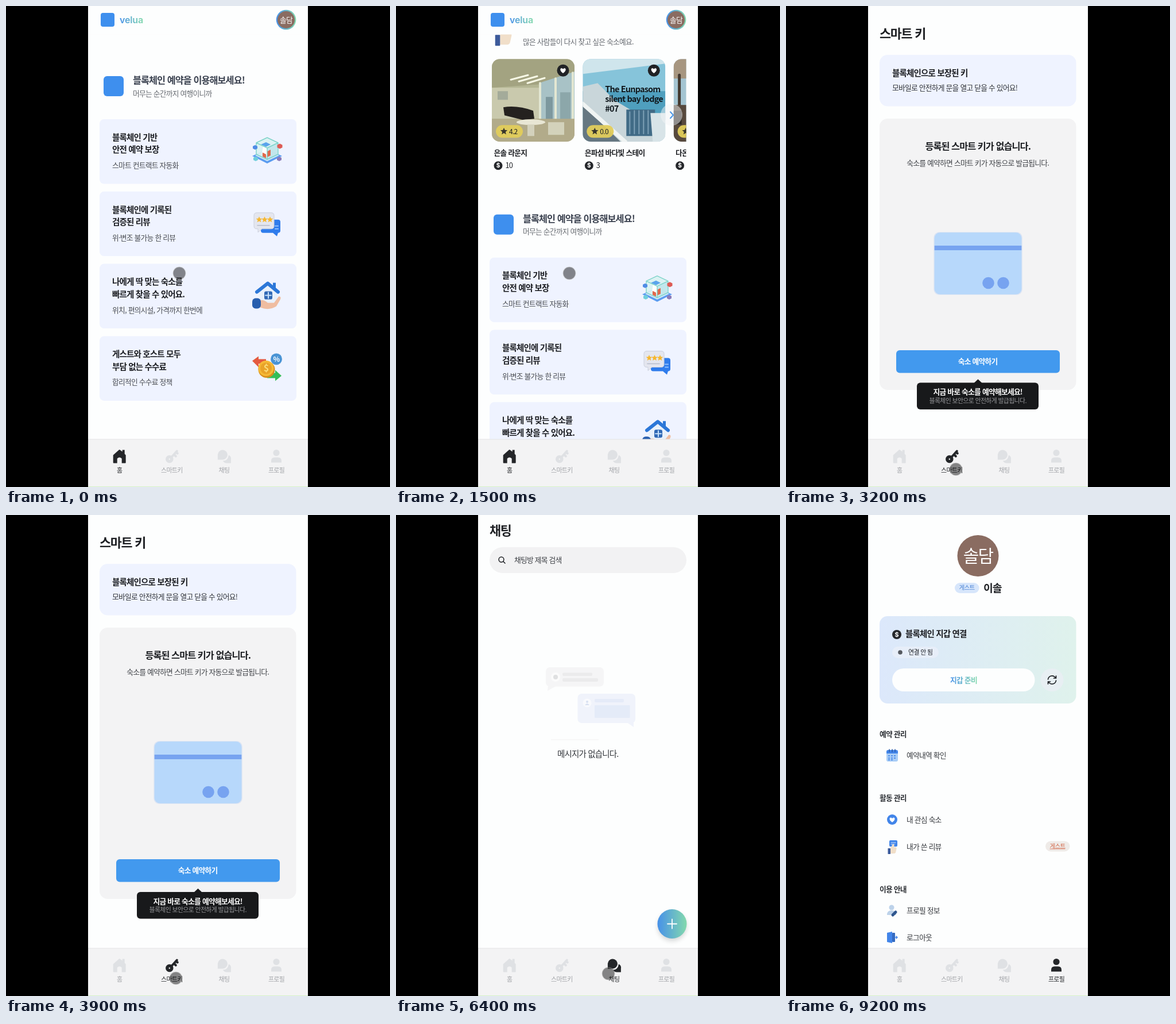
An HTML page that plays this animation: 669 by 837 pixels, repeating every 9300 ms.

```html
<!DOCTYPE html>
<html lang="ko">
<head>
<meta charset="utf-8">
<style>
html, body { margin: 0; width: 100%; height: 100%; overflow: hidden; background: #000; }
svg { display: block; }
text { font-family: "Noto Sans CJK KR", "Noto Sans CJK JP", "Noto Sans CJK", "Noto Sans", sans-serif; letter-spacing: -.058em; white-space: pre; }
.latin { font-family: Inter, sans-serif; letter-spacing: -.01em; }
</style>
</head>
<body>
<svg id="stage" width="669" height="837" viewBox="0 0 669 837"></svg>
<script>
const LOOP = 9300;
const BLUE = '#4285e9', INK = '#1d1f23', SOFT = '#666a70', BROWN = '#8a6c61';

// Drawing helpers
const rect = (x, y, w, h, fill, rx = 0, extra = '') =>
  `<rect x="${x}" y="${y}" width="${w}" height="${h}" rx="${rx}" fill="${fill}" ${extra}/>`;
const dot = (x, y, r, fill, extra = '') => `<circle cx="${x}" cy="${y}" r="${r}" fill="${fill}" ${extra}/>`;
const path = (d, fill = 'none', extra = '') => `<path d="${d}" fill="${fill}" ${extra}/>`;
const line = (d, color, w, extra = '') =>
  path(d, 'none', `stroke="${color}" stroke-width="${w}" stroke-linecap="round" stroke-linejoin="round" ${extra}`);
const at = (x, y, body, extra = '') => `<g transform="translate(${x} ${y})" ${extra}>${body}</g>`;
const text = (x, mid, size, str, { bold = 400, fill = INK, mode = 'start', cls = '' } = {}) =>
  `<text x="${x}" y="${mid + size * .36}" font-size="${size}" font-weight="${bold}" fill="${fill}" text-anchor="${mode}" class="${cls}">${str}</text>`;
const heavy = (x, mid, size, str, fill = INK, mode = 'start') => text(x, mid, size, str, { bold: 700, fill, mode });
const center = (mid, size, str, fill, bold = 400) => text(334.2, mid, size, str, { bold, fill, mode: 'middle' });

const heart = (x, y, k, fill) =>
  `<path transform="translate(${x} ${y}) scale(${k})" d="M0 9C-4 6-9 2-9-3C-9-9-2-9 0-4C2-9 9-9 9-3C9 2 4 6 0 9Z" fill="${fill}"/>`;
const star = (x, y, r, fill) => {
  const pts = Array.from({ length: 10 }, (_, i) => {
    const a = i * Math.PI / 5, q = i % 2 ? r * .45 : r;
    return (x + q * Math.sin(a)).toFixed(1) + ',' + (y - q * Math.cos(a)).toFixed(1);
  });
  return `<polygon points="${pts.join(' ')}" fill="${fill}"/>`;
};
const coin = (x, y, r) => dot(x, y, r, '#25272b') +
  text(x, y, r * 1.35, '$', { bold: 700, fill: '#fff', mode: 'middle', cls: 'latin' });
const loupe = (x, y) => dot(x - .5, y - .5, 4.4, 'none', `stroke="${INK}" stroke-width="1.5"`) +
  line(`M${x + 3} ${y + 3}l3 3`, INK, 1.5);
const search = (y, hint) => rect(163, y, 343, 45, '#f2f2f3', 22.5) +
  loupe(184, y + 22) + text(206, y + 22, 12.75, hint, { fill: '#3c3f44' });
const button = (x, y, w, label) => rect(x, y, w, 39.5, '#4299ee', 6) + center(y + 19.5, 12.75, label, '#fff', 700);

// Room pictures, 144 x 144
const frames = (x, y, n, colors) => Array.from({ length: n }, (_, i) =>
  rect(x + i * 19 % 62, y + i * 13 % 47, 9 + i % 3 * 3, 10 + i % 2 * 4, colors[i % colors.length])).join('');
const photos = {
  lamp: rect(0, 0, 144, 144, '#5f4c3a') + rect(0, 0, 34, 144, '#33281f') + rect(34, 0, 40, 90, '#4b3a29') +
    frames(74, 20, 9, ['#8d7d65', '#737069', '#45423c']) + line('M92 6l10 10 8-6 12 14 6-5 5 14', '#3b4229', 5) +
    dot(42, 76, 27, '#c9662a', 'opacity=".35"') + dot(42, 76, 15, '#ef8a37', 'opacity=".5"') + path('M31 79l6-13h11l7 13z', '#f58a3a') +
    rect(0, 100, 144, 44, '#3d2a1d') + path('M64 106l56 3 8 18-60-3z', '#c2b39c') + rect(74, 84, 20, 16, '#2b2723') +
    path('M12 136h76l8 8H12z', '#304663') + rect(41, 79, 4, 22, '#dd7a32') + rect(4, 45, 29, 34, '#221e1a'),
  studio: rect(0, 0, 144, 144, '#9c8565') + path('M0 0h144v18L70 9 0 30z', '#b5a27f') +
    frames(18, 8, 5, ['#cfc5ae', '#59605a']) + frames(82, 38, 7, ['#dccba9', '#756149']) +
    line('M57 5l8 12-6 10 9 11M50 32l14 6', '#4d5a38', 5) + rect(10, 43, 30, 25, '#63645e') +
    path('M0 75h78v54H0z', '#6b3c26') + rect(4, 69, 34, 12, '#3c6798') + rect(53, 84, 29, 40, '#2b2522') +
    line('M58 90v29M64 90v29M70 90v29M76 90v29', '#8c865f', 2) + path('M98 88l46-6v62h-39z', '#75432a') +
    path('M96 84l48-8v10l-46 8z', '#cfb491') + path('M40 132l60-10 10 22H40z', '#b87447') + path('M0 100q24 8 22 44H0z', '#65627a'),
  lounge: rect(0, 0, 144, 144, '#b4b694') + path('M0 0h144v24L84 44 0 50z', '#a3a381') +
    line('M33 36l30-8M47 39l32-9M62 42l30-9', '#f7f8e6', 3) + rect(0, 50, 84, 54, '#c9c9ad') + rect(10, 56, 18, 15, '#a4ab9a') +
    path('M82 42L144 22v98L82 108z', '#a8c2c6') + rect(94, 66, 12, 42, '#7d989e') + rect(119, 58, 18, 54, '#8ca7aa') +
    line('M84 42v67M111 34v78M141 24v94', '#e3e7d2', 4) + path('M0 104h144v40H0z', '#b2ab8a') +
    path('M20 84q24-4 52 6l2 14-20 2-32-8z', '#24211f') + `<ellipse cx="68" cy="110" rx="25" ry="5" fill="#e8e6d4"/>` +
    rect(62, 114, 12, 20, '#d3d1bc') + rect(98, 110, 28, 22, '#d3d2bb'),
  bay: rect(0, 0, 144, 144, '#86c4da') + path('M0 0h144v8L0 26z', '#cfe5ec') + rect(0, 56, 144, 50, '#4f9fbe') +
    path('M0 48l26-6 30 30 60 36 28 10v26H0z', '#c9d6da') + path('M0 80l66 64H0z', '#667781') + line('M0 78l74 66', '#f0f4f3', 7) +
    rect(76, 88, 50, 46, '#416b86') + line('M82 92v38M90 90v40M98 90v40M106 90v40M114 90v40', '#7da0b6', 2) + path('M118 94h26v50h-22z', '#d8e4e8') +
    ['The Eunpasom', 'silent bay lodge', '#07'].map((s, i) => text(39, 53 + i * 17, 14.5, s, { bold: 900, fill: '#10181d' })).join(''),
  window: rect(0, 0, 144, 144, '#a5c5d2') + rect(0, 0, 144, 34, '#a79680') + line('M10 28v76', '#443a31', 5) +
    rect(0, 80, 144, 64, '#57493d') + rect(0, 90, 14, 24, '#2e2925'),
  corner: rect(0, 0, 144, 144, '#6f7473') + rect(0, 45, 144, 45, '#467a9c') + rect(0, 90, 144, 54, '#41362e') + rect(8, 12, 18, 24, '#a99c83')
};

const stay = (x, y, mark, [pic, name, price, rate]) => at(x, y,
  `<g clip-path="url(#photo)">${photos[pic]}</g>` + dot(124, 20, 10.5, '#202225') + heart(124, 20, .52, mark) +
  rect(7, 115, 47, 22, '#e2cd5b', 11, 'opacity=".95"') + star(21, 126, 6.5, '#37352c') + text(30, 126, 12, rate, { bold: 500 }) +
  heavy(3.5, 163.5, 12.75, name) + coin(11, 185.5, 7.5) + text(23.5, 185.5, 12.75, price, { bold: 500 }));
const stays = (y, icon, mark, title, sub, list) => at(0, y, icon +
  heavy(221, 500, 16.3, title, '#3b4250') + text(221, 523, 12.75, sub, { fill: SOFT }) +
  `<g clip-path="url(#row)">${list.map((s, i) => stay(167 + i * 158.3, 553, mark, s)).join('')}` +
  dot(480, 650, 19, '#f3f6f8', 'opacity=".5"') + line('M478 645l5 5.5-5 5.5', '#4a96e8', 2) + '</g>');

// Feature icons around 0,0
const hex = (x, y, r, fill) => path(`M${x} ${y - r}l${r} ${r / 2}v${r}l${-r} ${r / 2}l${-r} ${-r / 2}v${-r}z`, fill);
const cube = path('M0-2L26 10 0 23-26 10z', '#5b9cf0') + path('M0-1L21 9 0 19-21 9z', '#cfe8f8') +
  path('M0-22L19-13V7L0 16-19 7v-20z', '#d9f3f1', 'opacity=".85"') + path('M0-4L19-13V7L0 16z', '#bce4ea', 'opacity=".8"') +
  path('M-7-8L0-5v15l-9-5z', '#fff') + path('M-11-10l9-4 8 4-8 4z', '#5aa4ec') + path('M0 2l6-3v10l-6 3zM-8 4l6 3v7l-6-3z', '#e06a4d') +
  line('M0-22L19-13V7L0 16-19 7v-20zM-19-13L0-4 19-13M0-4v20', '#7dd3c9', 1.4) +
  hex(-21, -5, 4, '#508ce6') + hex(22, -7, 4.5, '#dd5b55') + hex(-20, 15, 4, '#70cfdc') + hex(21, 15, 4, '#8b7cba');
const review = path('M-7-5h26q4 0 4 4v15q0 4-4 4l-2 6-7-6H-7q-4 0-4-4V-1q0-4 4-4z', '#2f7cec') + line('M14 6h5M14 11h5', '#8fc0ff', 2) +
  path('M-18-17H7q5 0 5 5V6q0 5-5 5h-16l-7 6v-6h-2q-5 0-5-5v-18q0-5 5-5z', '#e4e6ef', 'stroke="#cbd0dd"') +
  [-14, -4.5, 5].map(x => star(x, -5, 5.6, '#f6b72f')).join('') + line('M-17 5H4', '#b7bccb', 1.6);
const home = path('M-15-6L0-19 17-6V15h-31z', '#e9f1fb') + line('M-18-5L1-20 19-5', '#2c77d8', 6) +
  rect(10, -21, 5, 9, '#2c77d8') + rect(-5, -6, 14, 14, '#3169b5', 3) + line('M2-4V6M-3 1H7', '#c7e1fa', 2) +
  path('M-16 10q10-3 17 4h11l8-11q5-1 3 5l-7 12q-13 8-28 2z', '#efbda1') + rect(-26, 6, 15, 18, '#285eae', 6);
const fees = path('M-26-11l11-8v5h13v8h-13v6z', '#e45a3f') + path('M25 15l-11 9v-5H0v-9h14v-5z', '#35bd57') +
  dot(16, -14, 10, '#4a94d5') + heavy(16, -14, 12, '%', '#fff', 'middle') +
  dot(-1, 4, 14.5, '#d9901d') + dot(-2, 2, 13.5, '#f5b935') + dot(-2, 2, 10, '#e9a328') +
  text(-2, 2, 16, '$', { bold: 700, fill: '#fbdc79', mode: 'middle' });
const feature = ([icon, a, b, sub], i) => at(163, 1229 + i * 125.8, rect(0, 0, 343, 112.5, '#eff3ff', 8) +
  heavy(22, 31.5, 14.5, a) + heavy(22, 53, 14.5, b) + text(22, 80.5, 12.75, sub, { fill: '#4a4d53' }) + at(292, 54, icon));
const thumb = (x, y, k = 1) => `<g transform="translate(${x} ${y}) scale(${k})">` +
  path('M-6 0l8-15q6 0 5 7l-1 4h6q4 1 3 6l-3 13q-2 3-6 3H-6z', '#f1dfc9') + rect(-15, 0, 9, 20, '#3d5b9b', 1) + '</g>';

const homePage = `<g id="scroll">` + search(71, '검색을 시작해보세요!') +
  center(170, 18.2, '지금, 새로운 여행을 시작해보세요.', INK, 700) +
  center(196, 12.75, '원하는 숙소를 쉽고 빠르게 찾을 수 있어요.', SOFT) +
  rect(274, 278, 122, 35, '#f2f3f4', 3) + rect(282, 287, 18, 7, '#e0e2e5', 2) + rect(305, 287, 60, 7, '#e0e2e5', 3) + rect(305, 299, 72, 7, '#e0e2e5', 3) +
  dot(293.5, 307.5, 13.5, '#f8fafc', `stroke="${BLUE}" stroke-width="5"`) +
  line('M284 317l-4 5', BLUE, 5) + path('M278 317l7 6-10 13q-3 2-6-1-2-2 0-5z', BLUE) + button(163.5, 370, 342, '지금 검색하기') +
  stays(0, dot(187, 510, 16, BLUE) + heart(187, 510.5, .9, '#fff'), '#55524e', '좋아요 많은 숙소', '여행자들의 마음을 사로잡은 인기 숙소예요.', [
    ['lamp', '누리여숙 #별빛다락방', '2', '0.0'], ['studio', '담솔가옥', '2', '0.0'], ['corner', '포르마루', '3', '0.0']]) +
  stays(330.5, thumb(187, 511, .95), '#fff', '다시 찾는 숙소', '많은 사람들이 다시 찾고 싶은 숙소예요.', [
    ['lounge', '은솔 라운지', '10', '4.2'], ['bay', '은파섬 바다빛 스테이', '3', '0.0'], ['window', '다온 스테이', '4', '0.0']]) +
  rect(170, 1154, 35, 35, '#3e8fee', 6) + heavy(221, 1161, 16.3, '블록체인 예약을 이용해보세요!', '#3b4250') +
  text(221, 1184, 12.75, '머무는 순간까지 여행이니까', { fill: SOFT }) +
  [[cube, '블록체인 기반', '안전 예약 보장', '스마트 컨트랙트 자동화'],
   [review, '블록체인에 기록된', '검증된 리뷰', '위·변조 불가능 한 리뷰'],
   [home, '나에게 딱 맞는 숙소를', '빠르게 찾을 수 있어요.', '위치, 편의시설, 가격까지 한번에'],
   [fees, '게스트와 호스트 모두', '부담 없는 수수료', '합리적인 수수료 정책']].map(feature).join('') + '</g>' +
  rect(143, 0, 383, 49.5, '#fdfefe') + rect(165, 12, 24, 24, '#3e8fee', 4) +
  text(198, 24, 16, 'velua', { bold: 600, fill: 'url(#brand)', cls: 'latin' }) +
  dot(488, 24, 17.3, 'url(#brand)') + dot(488, 24, 15, BROWN) + text(488, 24, 12.75, '솔담', { fill: '#fff', mode: 'middle', bold: 500 });

const keyPage = heavy(163, 48.5, 21.8, '스마트 키') + rect(163, 85, 342.5, 89.5, '#eff3ff', 14) +
  heavy(185, 117, 14.5, '블록체인으로 보장된 키') + text(185, 142, 12.75, '모바일로 안전하게 문을 열고 닫을 수 있어요!', { fill: '#2f3237' }) +
  rect(163, 196, 342.5, 472, '#f3f3f4', 14) + center(244, 16.3, '등록된 스마트 키가 없습니다.', INK, 700) +
  center(273, 12.75, '숙소를 예약하면 스마트 키가 자동으로 발급됩니다.', '#3f4247') +
  `<g id="card">${rect(-76, -54, 152, 108, '#a4d2fb', 10) + rect(-76, -31, 152, 8, '#4080ea') + dot(18, 34, 10.3, '#4080ea') + dot(44, 34, 10.3, '#4080ea')}</g>` +
  rect(258, 394, 153, 108, '#d7e0f8', 9, 'fill-opacity=".36" stroke="#c9daf3" stroke-opacity=".5" stroke-width="1.5"') +
  button(192, 599, 285, '숙소 예약하기') +
  `<g id="tip">${path('M327 657l7.5-7 7.5 7z', '#18191b') + rect(228, 656, 212, 46.5, '#18191b', 6) +
    center(672, 12.75, '지금 바로 숙소를 예약해보세요!', '#fff', 700) + center(687.5, 10.9, '블록체인 보안으로 안전하게 발급됩니다.', '#98999c')}</g>`;

const chatPage = heavy(163, 27, 21.8, '채팅') + search(56, '채팅방 제목 검색') +
  `<g id="bubbles">${path('M265 296l-1 10 16-9z', '#f5f5f6') + rect(261, 265, 101, 33.5, '#f5f5f6', 7) + dot(278, 282, 8, '#fbfbfb') + dot(278, 282, 4, '#dfe0e1') +
    rect(290, 274.5, 52, 5.5, '#ebebec', 2) + rect(290, 284, 62, 6, '#ebebec', 2) +
    path('M401 360l13 9v-12z', '#f0f3fb') + rect(316.5, 311, 100.5, 51, '#f0f3fb', 7) + dot(333, 327, 7.5, '#f9fafd') +
    dot(333, 325, 2, '#d9e1f1') + path('M329 331q4-6 8 0z', '#d9e1f1') + rect(346, 320, 51, 6, '#e5ebf8', 2) + rect(346, 331, 61.5, 22, '#e4ebf8', 1)}</g>` +
  rect(270, 390.5, 83, 1, '#f3f4f4') + center(416, 14.5, '메시지가 없습니다.', '#34373c') +
  dot(481, 716, 25, '#000', 'opacity=".16" filter="url(#blur)"') + dot(481, 711.5, 25.5, 'url(#brand)') + line('M473 711.5h16M481 703.5v16', '#fff', 1.8);

const calendar = rect(-10, -9, 20, 20, '#a9cdf6', 3) + path('M-10-3v-3q0-3 3-3H7q3 0 3 3v3z', BLUE) +
  line('M-5-10v4M0-10v4M5-10v4', '#2b5aa7', 1.6) + line('M-6 1H7M-6 5H7M-6 8H3', BLUE, 2, 'stroke-dasharray="1 4"');
const likes = dot(0, 0, 9, BLUE) + heart(0, .3, .5, '#fff');
const written = rect(-5, -11, 14, 11, BLUE, 2) + line('M-2-7h8M-2-4h6', '#cfe2fb', 1) + thumb(0, 3, .5);
const person = dot(-1, -5, 4.5, '#bdd2ea') + path('M-9 8q0-8 8-8t8 8z', '#bdd2ea') + line('M1 8l5-5', '#2f568e', 5);
const exit = path('M-9-8l9-2v20l-9-2z', BLUE) + rect(0, -8, 5, 16, '#356ac0', 1) + line('M5 0h4M7-2l2 2-2 2', BLUE, 1.5);
const profilePage = dot(334.5, 71, 36, BROWN) + text(334.5, 71, 30, '솔담', { fill: '#fff', mode: 'middle' }) +
  rect(294, 118, 42.5, 18, '#d7e6fb', 9) + text(315, 126.5, 10.5, '게스트', { fill: '#4b83d5', mode: 'middle', bold: 500 }) + heavy(344, 127, 18.2, '이솔') +
  rect(163, 176, 342.5, 152, 'url(#wallet)', 14) + coin(193, 208, 8) + heavy(208, 207, 14.5, '블록체인 지갑 연결') +
  rect(185, 229, 81, 20, '#e7eef9', 10) + dot(199, 239, 3.8, '#555960') + text(213, 239, 10.9, '연결 안 됨', { bold: 500 }) +
  rect(185, 267, 248.5, 40, '#fdfefe', 20) + text(309.5, 287, 12.75, '지갑 준비', { bold: 700, fill: 'url(#brand)', mode: 'middle' }) +
  dot(463.5, 287, 20, '#e8eff3') + at(463.5, 287, line('M-7-1a7 7 0 0 1 12-4l2 2M7 1a7 7 0 0 1-12 4l-2-2M7-7v4H3M-7 7V3h4', INK, 1.7)) +
  [[381, '예약 관리'], [492, '활동 관리'], [651, '이용 안내']].map(([y, s]) => heavy(163, y, 12.75, s, '#2b2e33')).join('') +
  [[418, calendar, '예약내역 확인'], [530, likes, '내 관심 숙소'], [577, written, '내가 쓴 리뷰'], [688, person, '프로필 정보'], [735, exit, '로그아웃']]
    .map(([y, icon, s]) => at(185, y, icon) + text(210, y, 12.75, s, { fill: '#34373c' })).join('') +
  rect(452, 567.5, 42.5, 18, '#efebe8', 9) + text(473, 576, 10.5, '게스트', { fill: '#d3694b', mode: 'middle', bold: 500 }) + line('M460 581h26', '#d3694b', .8);

const tabs = [
  ['홈', path('M-11-2L-1-11q1-1 2 0l4 3v-3h4v7l2 2V11q0 1-1 1H4V4q-4-4-8 0v8h-6q-1 0-1-1z', 'currentColor')],
  ['스마트키', dot(-4, 5, 4, 'none', 'stroke="currentColor" stroke-width="5.5"') + line('M0 1L9-9M4-3l3 3M7-7l3 2', 'currentColor', 4)],
  ['채팅', path('M-11 6V-3a8.5 8.5 0 1 1 8.5 9z', 'currentColor') + path('M8-2q5 2 4 8v6H5q-5 0-7-4Q7 8 8-2z', 'currentColor')],
  ['프로필', dot(0, -6, 5.6, 'currentColor') + path('M-9 11V8q0-6 6-6h6q6 0 6 6v3z', 'currentColor')]
];
const nav = rect(143, 754, 383, 83, '#f3f3f4') + rect(143, 753.5, 383, 1, '#e3e4e6') + tabs.map(([label, icon], i) =>
  at(197.7 + i * 91.1, 783.5, `<g>${icon}</g>` + text(0, 24.5, 10.9, label, { mode: 'middle', fill: 'inherit' }), 'class="tab"')).join('');

const grad = (id, a, b) => `<linearGradient id="${id}"><stop stop-color="${a}"/><stop offset="1" stop-color="${b}"/></linearGradient>`;
const clip = (id, ...box) => `<clipPath id="${id}">${rect(...box)}</clipPath>`;
const stage = document.getElementById('stage');
stage.innerHTML = `<defs>${grad('brand', '#4791e9', '#83d9ad') + grad('wallet', '#dce8fb', '#dff2ec') +
  clip('app', 143, 0, 383, 837, '#000') + clip('row', 163, 540, 342.5, 220, '#000') + clip('photo', 0, 0, 144, 144, '#000', 14)}
  <filter id="blur" x="-50%" y="-50%" width="200%" height="200%"><feGaussianBlur stdDeviation="4"/></filter></defs>
  <g clip-path="url(#app)">${rect(143, 0, 383, 837, '#fdfefe')}
  ${[homePage, keyPage, chatPage, profilePage].map(p => `<g class="page">${p}</g>`).join('')}${nav}
  ${rect(143, 836, 383, 1, '#d5f3c6')}
  <g id="touch">${dot(0, 0, 10.5, '#000', 'fill-opacity=".46" stroke="#8d8d8d" stroke-opacity=".55" stroke-width="1.5"')}</g></g>`;

// Motion
const $ = id => document.getElementById(id);
const pages = [...stage.querySelectorAll('.page')], tabEls = [...stage.querySelectorAll('.tab')];
const opens = [0, 3200, 5550, 7750];
const touchPath = [[0, 302, 465], [2080, 302, 465], [2300, 298, 563], [2800, 296, 806], [4900, 296, 806],
  [5300, 370, 798], [6900, 370, 798], [7500, 482, 785], [LOOP, 482, 785]];
const progress = (t, from, to) => Math.min(1, Math.max(0, (t - from) / (to - from)));
const ease = p => p < .5 ? 4 * p ** 3 : 1 - 4 * (1 - p) ** 3;
const move = (el, x, y, more = '') => el.setAttribute('transform', `translate(${x} ${y}) ${more}`);
let shown = -1;

function draw(t) {
  const page = opens.filter(o => t >= o).length - 1;
  if (page !== shown) {
    pages.forEach((p, i) => p.style.display = i === page ? '' : 'none');
    tabEls.forEach((el, i) => {
      el.firstChild.setAttribute('color', i === page ? '#242629' : '#dfe1e4');
      el.setAttribute('fill', i === page ? '#242629' : '#a2a4a8');
    });
    shown = page;
  }
  move($('scroll'), 0, -1032 * (1 - ease(progress(t, 1152, 2052))));
  const turn = ease(progress(t, 4300, 5100));
  move($('card'), 334.5 - 10 * turn, 448 - 10 * turn, `rotate(${-45 * turn})`);
  move($('tip'), 0, .7 * Math.sin((t - 3900) / 3000 * Math.PI));
  $('bubbles').setAttribute('opacity', progress(t, 5550, 5950));

  const i = touchPath.findIndex(k => t < k[0]);
  const [t0, x0, y0] = touchPath[i - 1], [t1, x1, y1] = touchPath[i];
  const p = progress(t, t0, t1);
  move($('touch'), x0 + (x1 - x0) * p, y0 + (y1 - y0) * p);
  $('touch').style.display = t < 8500 ? '' : 'none';
}

const start = performance.now();
function tick() {
  draw(Math.max(0, performance.now() - start) % LOOP);
  requestAnimationFrame(tick);
}
tick();
</script>
</body>
</html>
```
